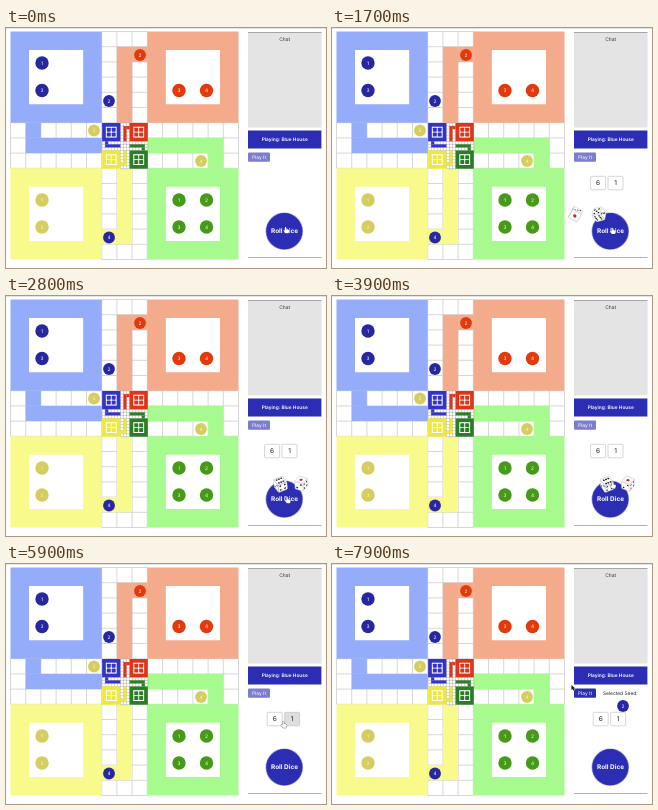
An HTML page with a canvas that plays this animation: 320 by 240 pixels, repeating every 8000 ms.

```html
<!DOCTYPE html>
<html>
<head>
<meta charset="utf-8">
<style>
html, body { margin: 0; overflow: hidden; background: #fff; }
canvas { display: block; }
</style>
</head>
<body>
<canvas id="stage" width="320" height="240"></canvas>
<script>
const ctx = document.getElementById('stage').getContext('2d');
const LOOP = 8000, ROLL = 1400, CLEAR = 5600, SELECT = 7200;
const NAVY = '#2b2db2';
const TOKENS = { blue: '#2727a0', red: '#e23a0c', yellow: '#d5ce5f', green: '#459a18' };
const PALE = ['#95acfa', '#f4ab8c', '#f8fa8c', '#a7fa8d'];
const VIVID = ['#3333c8', '#e03418', '#efe83c', '#2b7d26'];

function rect(x, y, w, h, fill, stroke, radius = 0) {
  ctx.beginPath();
  ctx.roundRect(x, y, w, h, radius);
  if (fill) { ctx.fillStyle = fill; ctx.fill(); }
  if (stroke) { ctx.strokeStyle = stroke; ctx.stroke(); }
}

function disc(x, y, r, fill) {
  ctx.beginPath();
  ctx.arc(x, y, r, 0, 7);
  ctx.fillStyle = fill;
  ctx.fill();
}

function text(str, x, y, size, fill, weight = 400) {
  ctx.font = `${weight} ${size}px Inter, sans-serif`;
  ctx.textRendering = 'geometricPrecision';
  ctx.textAlign = 'center';
  ctx.textBaseline = 'middle';
  ctx.fillStyle = fill;
  ctx.fillText(str, x, y + size * .06);
}

function token(n, color, x, y, r) {
  disc(x, y, r, TOKENS[color]);
  text(n, x, y, 4.8, color === 'yellow' ? '#f4f2cf' : '#fff');
}

// Board of 15 x 15 cells; colours run blue, red, yellow, green.
function board(x, y, cell, colors, line) {
  const fill = (c, r, w, h, color) => rect(x + c * cell, y + r * cell, w * cell, h * cell, color);
  fill(0, 0, 15, 15, '#fff');
  ctx.strokeStyle = line;
  ctx.lineWidth = cell > 5 ? .7 : .25;
  ctx.beginPath();
  for (let i = 0; i <= 15; i++) {
    const from = i < 6 || i > 9 ? 6 : 0, to = 15 - from;
    ctx.moveTo(x + i * cell, y + from * cell);
    ctx.lineTo(x + i * cell, y + to * cell);
    ctx.moveTo(x + from * cell, y + i * cell);
    ctx.lineTo(x + to * cell, y + i * cell);
  }
  ctx.stroke();
  const lanes = [[1, 7, 5, 1, 1, 6], [7, 1, 1, 5, 8, 1], [7, 9, 1, 5, 6, 13], [9, 7, 5, 1, 13, 8]];
  lanes.forEach(([c, r, w, h, startC, startR], i) => {
    fill(c, r, w, h, colors[i]);
    fill(startC, startR, 1, 1, colors[i]);
  });
  colors.forEach((color, i) => {
    const c = i % 2 * 9, r = (i >> 1) * 9;
    fill(c, r, 6, 6, color);
    fill(c + 1.22, r + 1.22, 3.56, 3.56, '#fff');
  });
}

function drawBoard() {
  board(4.5, 3.5, 15.2, PALE, '#c6c6ca');
  const x = 96.1, y = 95, cell = 3.05;
  board(x, y, cell, VIVID, '#555');
  VIVID.forEach((color, i) => {
    for (let k = 0; k < 4; k++) {
      const c = i % 2 * 9 + 1.55 + k % 2 * 1.6, r = (i >> 1) * 9 + 1.55 + (k >> 1) * 1.6;
      rect(x + c * cell, y + r * cell, 1.3 * cell, 1.3 * cell, color, null, .6);
    }
  });
  const places = {
    blue: [[36, 35], [103, 73], [36, 62.5], [103, 209.5]],
    red: [null, [134, 27], [173, 62.5], [200.5, 62.5]],
    yellow: [[36, 172], [88, 102.5], [36, 199], [195, 133]],
    green: [[173, 172], [200.5, 172], [173, 199], [200.5, 199]]
  };
  for (const color in places) {
    places[color].forEach((p, i) => {
      if (!p) return;
      const onTrack = p.some(v => v > 95 && v < 141);
      token(i + 1, color, ...p, onTrack ? 5.9 : 6.7);
    });
  }
}

function pips(n) {
  const list = [];
  if (n % 2) list.push([0, 0]);
  if (n > 1) list.push([-.5, -.5], [.5, .5]);
  if (n > 3) list.push([-.5, .5], [.5, -.5]);
  if (n === 6) list.push([-.5, 0], [.5, 0]);
  return list;
}

// faces lists the values on +x, -x, +y, -y, +z, -z
function die(x, y, half, faces, roll, yaw, pitch) {
  const spin = (a, b, t) => [a * Math.cos(t) - b * Math.sin(t), a * Math.sin(t) + b * Math.cos(t)];
  const axis = k => {
    let [px, py, pz] = [0, 1, 2].map(i => i === k ? half : 0);
    [px, py] = spin(px, py, roll);
    [px, pz] = spin(px, pz, yaw);
    [py, pz] = spin(py, pz, pitch);
    return [px, py, pz];
  };
  const axes = [0, 1, 2].map(axis);
  faces.forEach((value, i) => {
    const k = i >> 1, sign = i % 2 ? -1 : 1;
    const n = axes[k], u = axes[(k + 1) % 3], v = axes[(k + 2) % 3];
    if (n[2] * sign <= 0) return;
    ctx.save();
    ctx.transform(u[0], u[1], v[0], v[1], x + n[0] * sign, y + n[1] * sign);
    ctx.lineWidth = .1;
    rect(-1, -1, 2, 2, '#fafafa', '#bbb', .2);
    pips(value).forEach(p => disc(...p, value === 1 ? .34 : .2, value === 1 ? '#d3202a' : '#151515'));
    ctx.restore();
  });
}

function drawDice(t) {
  const rest = (1 - Math.min(1, (t - ROLL) / 1600)) ** 2;
  die(275.2 - 48 * rest, 188.3 - 3 * rest, 5, [4, 3, 2, 5, 6, 1], 1.1, 5 * rest, .7 + 8 * rest);
  die(296 - 44 * rest, 187.6 - 2 * rest, 4.8, [4, 3, 2, 5, 1, 6], .5, 5 * rest, .8 + 7 * rest);
}

function cursorAt(t) {
  const path = [[0, 279, 199], [600, 279, 199], [900, 279.5, 199.5], [2300, 279.5, 200], [2900, 280.5, 201],
    [3500, 280.5, 201], [4500, 278, 159], [5400, 276.5, 157.5], [6200, 276.5, 157.5],
    [7000, 104, 73], [7200, 104, 73], [7800, 239.5, 121], [LOOP, 239.5, 121]];
  const i = path.findIndex(p => p[0] > t);
  const [t0, x0, y0] = path[i - 1], [t1, x1, y1] = path[i];
  const u = (t - t0) / (t1 - t0), e = u * u * (3 - 2 * u);
  return [x0 + (x1 - x0) * e, y0 + (y1 - y0) * e];
}

function drawCursor(x, y, hand) {
  const shape = hand
    ? 'M0 0q.8-.6 1.2.2v2l2.4.5q.8.3.6 1.4l-.6 2.2h-3.2l-1.9-2.6q0-.8.8-.5l.7.6z'
    : 'M0 0v5l1.2-1.1.8 1.9.9-.4-.8-1.8h1.6z';
  const path = new Path2D(shape);
  ctx.save();
  ctx.translate(x, y);
  ctx.lineWidth = .6;
  ctx.strokeStyle = hand ? '#222' : '#fff';
  ctx.fillStyle = hand ? '#fff' : '#111';
  ctx.stroke(path);
  ctx.fill(path);
  ctx.restore();
}

function drawPanel(t, hoverOne) {
  const selected = t >= SELECT;
  rect(242, 5, 73.5, 94.5, '#e4e4e4');
  rect(242, 4.3, 73.5, .8, '#888');
  rect(242, 229.3, 73.5, .7, '#999');
  text('Chat', 278.7, 11, 4.9, '#333');
  rect(242, 102.6, 73.4, 17.9, NAVY);
  text('Playing: Blue House', 278.7, 111.7, 4.8, '#fff', 600);
  rect(242, 124.5, 22, 9.3, selected ? NAVY : '#7b7dcf', null, 1);
  text('Play It', 253, 129.1, 4.9, '#fff');
  if (selected) {
    text('Selected Seed:', 288.3, 129.2, 4.9, '#222');
    token(2, 'blue', 291, 142, 5.9);
  }
  ctx.lineWidth = .6;
  if (t >= ROLL) {
    const x = t < CLEAR ? 258.6 : 261.2;
    const shade = hoverOne && t >= CLEAR ? '#dedede' : '#fff';
    rect(x, 148.3, 15, 13.5, '#fff', '#bbb', 1);
    rect(x + 17.4, 148.3, 15, 13.5, shade, '#bbb', 1);
    text('6', x + 7.5, 155, 6.6, '#222');
    text('1', x + 24.9, 155, 6.6, '#222');
  }
  disc(278.3, 203.2, 18.8, '#a9aae2');
  disc(278.3, 203.2, 18.1, NAVY);
  text('Roll Dice', 278.5, 202.8, 6.4, '#fff', 700);
}

function draw(now) {
  const t = now % LOOP;
  const [x, y] = cursorAt(t);
  const hoverOne = x > 275 && x < 292 && y > 147 && y < 162;
  const onRoll = Math.hypot(x - 278.5, y - 203) < 18;
  const onToken = Math.hypot(x - 103, y - 73) < 7;
  rect(0, 0, 320, 240, '#fff');
  rect(0, 0, 320, .4, '#ccc');
  drawBoard();
  drawPanel(t, hoverOne);
  if (t >= ROLL && t < CLEAR) drawDice(t);
  drawCursor(x, y, hoverOne || onRoll || onToken);
  requestAnimationFrame(draw);
}
requestAnimationFrame(draw);
</script>
</body>
</html>
```
